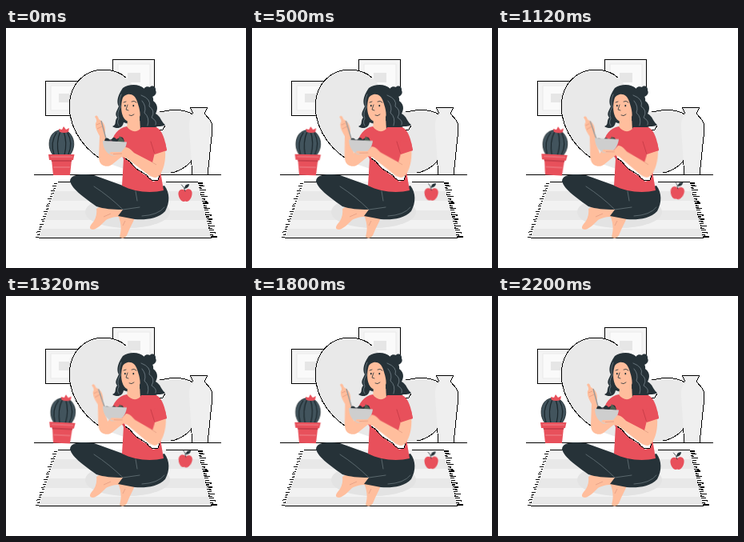
Recreate the animation shown at these times as an HTML page. Size 300x300 px, loop 2.72 s.

```html
<!DOCTYPE html>
<html lang="en">
<head>
<meta charset="utf-8">
<title>Healthy meal</title>
<style>
html, body { margin: 0; width: 100%; height: 100%; overflow: hidden; background: #fff; }
svg { display: block; width: 100vw; height: 100vh; }
.ink { fill: #263238; }
.red { fill: #e8505b; }
.skin { fill: #ffbe9d; }
.line { fill: none; stroke: #263238; stroke-width: .8; stroke-linecap: round; stroke-linejoin: round; }
.edge { fill: none; stroke: #000; stroke-width: 1; shape-rendering: crispEdges; }
.crease { fill: none; stroke: #d9907a; stroke-width: .6; }
.curl { fill: none; stroke: #90a0a8; stroke-width: .6; stroke-linecap: round; }

/* Sway out for 1.1 s, back for 1.1 s, then rest */
.sway { animation: sway 2720ms ease-in-out infinite; }
@keyframes sway {
  0%, 80.9%, 100% { transform: none; }
  40.45% { transform: translate(var(--x, 0px), var(--y, 0px)) rotate(var(--r, 0deg)); }
}
#plant { --r: 3deg; transform-origin: 69px 184px; }
#apple { --y: -3px; --r: 10deg; transform-origin: 224px 209px; }
#far-arm { --r: -4deg; transform-origin: 123px 170px; }
#bowl { --y: -3.5px; }
#food { --y: 4px; }
#near-arm { --r: 3deg; transform-origin: 191px 172px; }
</style>
</head>
<body>
<svg viewBox="0 0 300 300">
  <!-- Pictures -->
  <path fill="#f4f4f4" d="M49.500 66.500H93V109H49.500ZM133.500 39.500H185.500V80H133.500Z"/>
  <path class="edge" d="M93 66.500H49.500V109.500H93M133.500 80V39.500H185.500V80"/>
  <g fill="#fafafa" stroke="#e6e6e6" stroke-width=".8">
    <path d="M56 72H90V103H56Z"/>
    <path d="M140 45H180V78H140Z"/>
  </g>
  <path fill="#e6e6e6" d="M66 82H82V93H66ZM152 56H168V68H152Z"/>

  <!-- Backdrop and vase -->
  <path fill="#e9e9e9" d="M79 98C80 69 99 52 122 52C146 52 160 66 167 92C171 109 185 106 204 103C230 100 244 113 245 132C246 154 229 178 206 181C180 186 150 178 128 169C101 156 80 130 79 98Z"/>
  <path class="edge" d="M79 98C80 69 99 52 122 52C134 52 143 56 150 62M79 98C80 130 101 156 128 169M192 105L204 103C217 101.500 228 104 235 109M239 156C232 169 220 179 206 181"/>
  <path fill="#efefef" d="M230 99H252L248 107C253 113 259 117 258 126L252 184H233L229 126C228 117 231 112 234 107Z"/>
  <path class="edge" d="M234 107L230 99H252L248 107C253 113 259 117 258 126L252 184M233 184L231.500 165"/>
  <path class="edge" stroke-width="2" d="M35 183.500H269"/>

  <!-- Rug -->
  <path fill="#f2f2f2" d="M65 192H240L257 262H41Z"/>
  <path fill="#e8e8e8" d="M61 204H243L246 216H57ZM53 228H249L252 240H49ZM45 251H254L257 262H41Z"/>
  <ellipse cx="152" cy="230" rx="53" ry="20" fill="#e3e3e3"/>
  <path class="edge" d="M41 262.500H257M65 192.500H82M200 192.500H240"/>
  <g id="fringe" class="edge"></g>

  <!-- Potted cactus -->
  <g id="plant" class="sway">
    <path fill="#42545d" stroke="#182226" stroke-width=".8" d="M60 160C51 151 53 135 61 130C67 126 76 127 80 132C87 140 86 152 79 160Z"/>
    <path class="line" style="stroke:#1c282d;stroke-width:1.300" d="M60 158Q55 143 63 131M66 159Q62 143 68 129M73 159Q77 143 72 129M78 158Q84 144 77 131"/>
    <path class="red" d="M67 130L66 126L70 127L72 123L75 127L79 125L78 130Q73 132 67 130Z"/>
    <path class="red" d="M53 158H85.500L84 165H82L80 184H59L57 165H54Z"/>
    <path fill="#c93f4b" d="M56.500 165H82.500L82 167H57Z"/>
    <path fill="none" stroke="#f3a0a5" stroke-width=".7" d="M56 161H83M59 174H80"/>
  </g>

  <!-- Apple -->
  <g id="apple" class="sway">
    <path class="red" d="M224 203C229 199 233.500 203 232.500 208C232 213 228 218.500 224 216.500C220 218.500 216 213 215.500 208C215 203 219 200 224 203Z"/>
    <path class="line" d="M224 204Q223 199 219.500 196"/>
    <path class="ink" d="M223 201Q223 195 229 195Q229 200 223 201Z"/>
  </g>

  <!-- Bright gap below the hair, then the hair -->
  <path fill="#fff" d="M174 120L199 121L196 127L190 128L188 132L182 130L178 132Z"/>
  <path class="edge" d="M199 122L196 127L190 128L188 132L182 130"/>
  <path class="ink" d="M172 80C171 74 176 72 180 74C182 71 188 73 187 78C190 83 183 88 177 86C173 86 171 83 172 80Z"/>
  <path class="ink" d="M146 75C153 70 166 69 173 76C181 80 185 86 184 91C190 95 190 102 187 107C194 111 193 116 199 121C195 124 190 122 187 124C184 127 180 125 177 126C170 128 164 125 160 122L147 118C146 125 139 127 133 123C139 121 135 116 139 112C135 107 139 103 141 98C137 92 141 82 146 75Z"/>

  <!-- Legs and feet -->
  <path class="skin" d="M118 223L148 225L151 236C141 235 131 236 125 240C119 246 114 251 109 252C104 252 104 249 107 245C112 240 114 233 113 226ZM140 234L161 237C158 245 154 251 152 257C150 263 145 264 142 261C144 254 145 246 140 234Z"/>
  <path class="ink" d="M80 191C81 182 96 182 110 184L146 197C163 204 182 203 198 197C205 206 205 218 199 229C190 239 173 240 161 239L140 235L146 227C133 227 122 226 113 223C101 214 82 202 80 191Z"/>
  <path class="line" style="stroke:#7d8b91;stroke-width:.6" d="M110 198Q130 211 146 227L167 224M162 204L164 216M170 235Q190 234 198 224"/>
  <path class="crease" d="M122 236L131 232M146 247L149 241"/>

  <!-- Neck and shirt -->
  <path class="skin" d="M152 113L167 111L168 128Q160 135 151 128Z"/>
  <path class="red" d="M151 123C156 131 166 131 169 124L188 124C196 128 199 141 201 153L186 158L191 167L197 203C181 207 160 205 145 197L147 163L132 145C133 134 140 125 151 123Z"/>
  <path class="line" style="stroke:#bc3541;stroke-width:.7" d="M186 158L181 142M151 151L147 163"/>

  <!-- Bright gap under the near arm -->
  <path fill="#fff" d="M147 157L184 176L192 183L190 190L184 192L178 186L171 182L163 176L158 170L150 164Z"/>
  <path class="edge" d="M149 163L155 167L158 171L163 176L171 181L176 184L179 188L184 191L190 190L192 184"/>

  <!-- Face -->
  <path class="skin" d="M146 87C149 80 161 78 167 86L169 106C167 115 158 121 151 116C143 111 143 96 146 87Z"/>
  <path class="ink" d="M145 88C147 77 161 74 169 83C176 92 171 104 176 114L167 116C169 106 166 98 164 92C162 85 157 82 152 83C148 84 147 86 145 88Z"/>
  <path class="line" d="M147 93L150 92M157 92Q160 90 163 93M152 96L150 102L153 103M154 109Q157 111 160 108"/>
  <path class="ink" d="M148 96h1.600v2.200h-1.600zM158.500 96h1.600v2.200h-1.600z"/>
  <g class="curl">
    <path d="M169 84Q182 89 179 98Q187 103 182 112Q189 116 187 121"/>
    <path d="M170 91Q176 98 173 106Q180 112 177 122"/>
    <path d="M144 83Q140 92 143 99Q138 106 141 113Q138 118 141 122"/>
  </g>

  <!-- Far arm: elbow, then forearm with spoon -->
  <path class="skin" d="M132 144L147 159L132 171C126 175 118 172 117 166L128 156Z"/>
  <g id="far-arm" class="sway">
    <path class="skin" d="M111 111C113 108 115 110 116 114C121 116 124 121 124 127L124 142L128 157L126 171C120 173 116 168 116 161L117 135C114 130 111 124 112 119C114 116 113 114 111 111Z"/>
    <path class="crease" d="M113 121L118 119M114 126L120 123"/>
    <path d="M119 116L125.500 140" fill="none" stroke="#9a9a9a" stroke-width="1.400"/>
  </g>

  <!-- Bowl -->
  <g id="bowl" class="sway">
    <g id="food" class="sway">
      <path class="ink" d="M123 143Q123 136 128 138Q130 141 133 138Q135 135 138 139L142 137Q147 134 148 143Z"/>
      <path fill="#73505f" d="M127 143l4-3 4 3zM138 143l3-3 3 3z"/>
      <path fill="#4c6152" d="M140 142l2-7 4 4 2 3z"/>
    </g>
    <path fill="#cecece" d="M121 141L151 142.500C150 151 145 158 139 159.500H132C126 157 121 150 121 141Z"/>
  </g>

  <!-- Near arm -->
  <g id="near-arm" class="sway">
    <path class="skin" d="M186 156L199 153C200 165 197 178 192 184C188 189 182 187 176 182L151 163C144 160 134 160 129 157L131 155L144 155L149 149C154 149 157 153 160 156L183 168Z"/>
    <path class="crease" d="M134 157.500L145 157M183 168L188 171"/>
  </g>
  <path class="red" d="M185 140L199 143L201 153L186 158Z"/>
</svg>
<script>
// Fringe threads along both slanted ends of the rug
const threads = (n, x0, x1, length, width) => {
  let d = "";
  for (let i = 0; i < n; i++) {
    const u = i / (n - 1);
    const reach = length * (0.75 + 0.25 * Math.sin(i * 2.4));
    d += `M${x0 + (x1 - x0) * u} ${194 + 67 * u}l${reach} ${i % 3 * 0.5}`;
  }
  return `<path d="${d}" stroke-width="${width}"/>`;
};
document.getElementById("fringe").innerHTML =
  threads(22, 64, 41, -5, 1) + threads(25, 240, 256, 8, 1.3);
</script>
</body>
</html>
```
